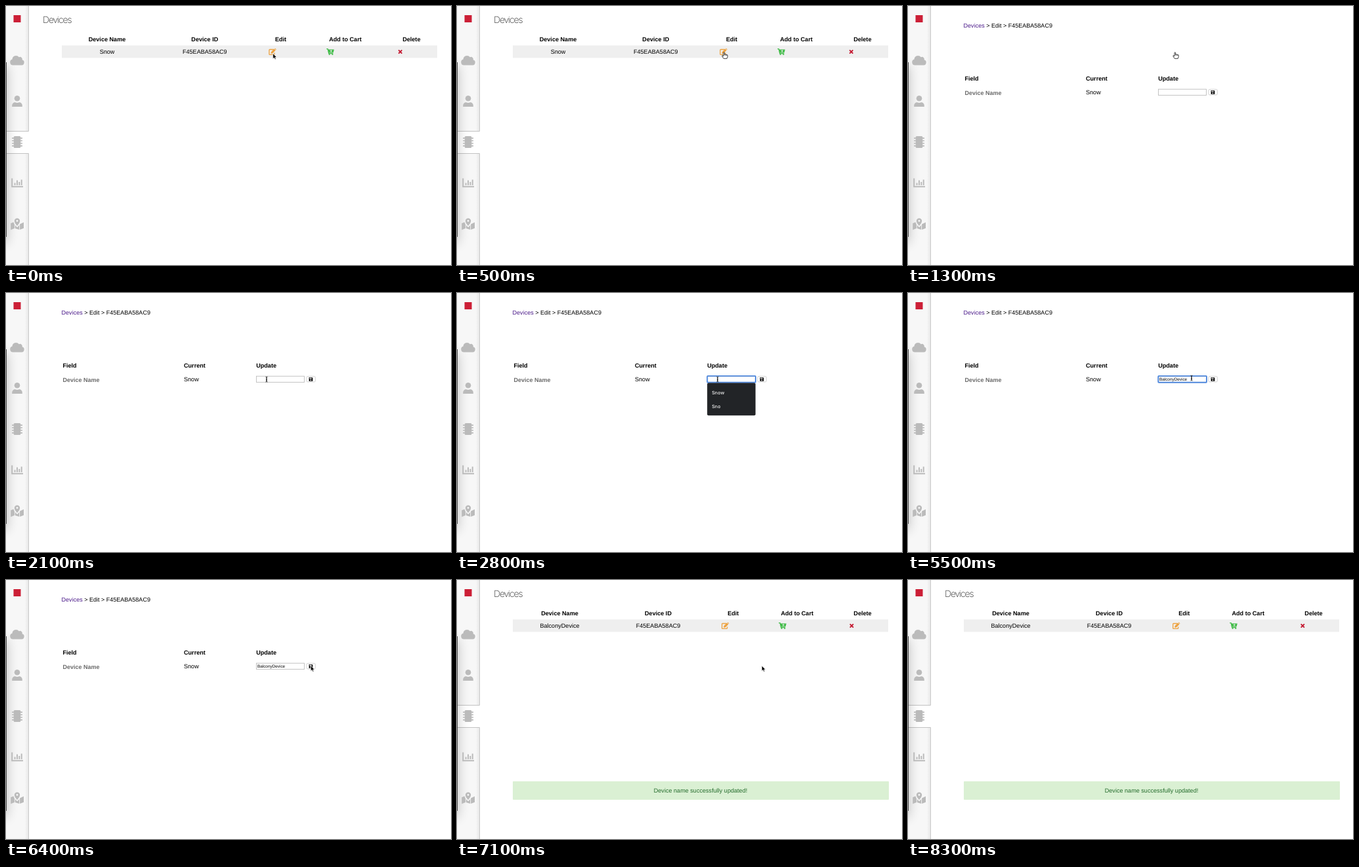
Write an HTML page that moves like this. It is 678 px wide and 396 px high and loops after 9.1 s.

```html
<!DOCTYPE html>
<html lang="en">
<head>
<meta charset="utf-8">
<title>Devices</title>
<style>
  html, body { margin: 0; width: 100%; height: 100%; overflow: hidden; background: #fff; }
  svg { display: block; }
  text { font: 9.1px "Liberation Sans", Arial, sans-serif; text-rendering: geometricPrecision; }
  .b { font-weight: bold; }
  .mid { text-anchor: middle; }
  .title { font: 200 14px Inter, Roboto, sans-serif; letter-spacing: -1.15px; fill: #222; }
  .crumb { font-size: 9.03px; }
  .typed { font-size: 6.4px; }
  .option { font: 500 7.2px Inter, sans-serif; fill: #f2f2f2; }
</style>
</head>
<body>
<svg width="678" height="396" viewBox="0 0 678 396">
  <defs>
    <linearGradient id="edge">
      <stop offset="0" stop-color="#000" stop-opacity="0"/>
      <stop offset="1" stop-color="#000" stop-opacity=".07"/>
    </linearGradient>
    <filter id="soft" x="-40" y="-60" width="100" height="520" filterUnits="userSpaceOnUse">
      <feGaussianBlur stdDeviation="9"/>
    </filter>
    <clipPath id="side"><rect width="34" height="396"/></clipPath>
  </defs>

  <!-- sidebar -->
  <rect width="34.5" height="396" fill="#f7f7f7"/>
  <rect x="29" width="5.5" height="396" fill="url(#edge)"/>
  <rect x="34" width="1" height="396" fill="#c9c9c9"/>
  <g id="tab">
    <rect y="191.5" width="35" height="34" fill="#fff"/>
    <path d="M0 191.5H34.5M0 225.5H34.5" stroke="#bdbdbd" stroke-width=".9"/>
  </g>
  <g clip-path="url(#side)">
    <rect x="-14" y="92" width="15" height="270" fill="#000" opacity=".24" filter="url(#soft)"/>
    <rect y="86" width="1" height="267" fill="#4a4a4a"/>
  </g>
  <rect x="11.5" y="14" width="11" height="11" fill="#cc1f36"/>
  <g fill="#bbb">
    <path d="M10.5 90.5a4.6 4.6 0 0 1-1-9 5.7 5.7 0 0 1 10.3-3.2 3.4 3.4 0 0 1 4.9 4 4.2 4.2 0 0 1-.8 8.2z"/>
    <circle cx="17" cy="141.2" r="4.3"/>
    <path d="M9.2 153.9v-2a4.6 4.6 0 0 1 4.6-4.6q3.2 1.4 6.4 0a4.6 4.6 0 0 1 4.6 4.6v2z"/>
    <rect x="11.7" y="199" width="10.6" height="18" rx="1.6"/>
    <path d="M9 202.2h16M9 206h16M9 210h16M9 213.8h16" stroke="#bbb" stroke-width="1.7"/>
    <path d="M9.2 263.5V276.3H26M13.6 274v-3.6M17 274v-7.6M20.3 274v-5M23.7 274v-8.6" fill="none" stroke="#bbb" stroke-width="2"/>
    <path d="M7.2 332.3l4.2-1.7q.9 2.5 1.5 3.3v6.2l-5.7 2.2zM13.8 335l3.2 3.6 3.2-3.6v7l-6.4-2zM21.1 333.6l5.9-2.8v9l-5.9 2.3z"/>
    <path d="M17 336.3c-1.6-2-4.2-4.8-4.2-7.7a4.2 4.2 0 0 1 8.4 0c0 2.900-2.600 5.700-4.200 7.700zM17 327a1.500 1.500 0 1 0 .01 0z" fill-rule="evenodd"/>
  </g>

  <g id="before"></g>
  <g id="after"></g>

  <!-- edit form -->
  <g id="form">
    <text class="crumb" x="84.600" y="32.800"><tspan fill="#4b1a8a">Devices</tspan> &gt; Edit &gt; F45EABA58AC9</text>
    <text class="b" x="86.400" y="114.200">Field</text>
    <text class="b" x="271" y="114.200">Current</text>
    <text class="b" x="381.200" y="114.200">Update</text>
    <text class="b" x="86.400" y="135.700" fill="#6b6b6b" style="font-size:9px">Device Name</text>
    <text x="271" y="135.200">Snow</text>
    <rect x="381.500" y="127.200" width="73" height="9.200" fill="#fff" stroke="#bcbcbc" stroke-width=".9"/>
    <rect id="ring" x="381.300" y="126.900" width="73.600" height="9.800" rx=".8" fill="none" stroke="#4e87dc" stroke-width="1.900"/>
    <text id="typed" class="typed" x="382.900" y="134.100"></text>
    <rect id="caret" y="128.500" width=".8" height="7.200"/>
    <rect id="button" x="458" y="127.400" width="13.400" height="8.600" rx="2" fill="#fff" stroke="#c8c8c8" stroke-width=".8"/>
    <path d="M461.600 129h4.700l1 1v4.700h-5.700zM462.500 129.800v1.500h3.200v-1.500zM464.400 132.200a.9.9 0 1 0 .01 0z" fill-rule="evenodd"/>
    <g id="menu">
      <rect x="381.200" y="137.600" width="73.600" height="49.600" rx="2" fill="#222427"/>
      <text class="option" x="388.200" y="155.200">Snow</text>
      <text class="option" x="388.200" y="175.500">Sno</text>
    </g>
  </g>

  <!-- pointers, hot spot at 0,0 -->
  <g id="pointer">
    <path id="arrow" d="M0 0V8.200L1.900 6.500 3.200 9.300 4.600 8.700 3.400 6H5.900z" stroke="#fff" stroke-width=".7"/>
    <path id="hand" d="M-1 .9q1-1.500 1.700 0V3.600q1-.8 1.600.2 1-.7 1.600.3 1.300-.4 1.300 1V7.300l-1 2.600H-.7L-3.100 6.300q-.3-1.500 1-1L-1 6.300zM.7 3.600V5M2.300 3.900V5.200M3.900 4.200V5.400" fill="#fff" stroke="#111" stroke-width=".8" stroke-linejoin="round"/>
    <path id="beam" d="M-1.500-4Q0-4 0-3V3Q0 4-1.500 4M1.500-4Q0-4 0-3V3Q0 4 1.500 4M-.9.900H.9" fill="none" stroke="#111" stroke-width=".8"/>
  </g>
</svg>
<script>
const $ = id => document.getElementById(id);
const show = (id, on) => $(id).setAttribute('display', on ? 'inline' : 'none');

const icons = {
  edit: `<path d="M7.500 1.700H1.600Q.7 1.700.7 2.600V8.700Q.7 9.600 1.600 9.600H7.800Q8.700 9.600 8.700 8.700V6.600" fill="none" stroke="#eda23f" stroke-width="1.300"/>
    <path d="M3.600 5.500L8.300.8 10.500 3 5.800 7.700 3.300 8zM8.800.3Q9.600-.3 10.300.3L11.100 1.100Q11.700 1.800 11.100 2.500z" fill="#eda23f"/>`,
  cart: `<g fill="#3fbb46"><path d="M0 .8H2L3.500 7.700H10" fill="none" stroke="#3fbb46" stroke-width="1.300"/>
    <path d="M2.300 1.700H11.600L10.400 6.500H3.300z"/><circle cx="4.400" cy="9.200" r="1.100"/><circle cx="9.100" cy="9.200" r="1.100"/></g>
    <path d="M7 2.300V5.700M5.300 4H8.700" stroke="#efefef" stroke-width=".9"/>`,
  remove: '<path d="M.9.900L6.100 6.100M6.100.9L.9 6.100" stroke="#c3142d" stroke-width="1.900"/>'
};
const label = (x, y, s, cls = '') => `<text class="mid ${cls}" x="${x}" y="${y}">${s}</text>`;
const icon = (name, x, y) => `<g transform="translate(${x} ${y})">${icons[name]}</g>`;

function deviceList(name, columns, [edit, cart, remove]) {
  const heads = ['Device Name', 'Device ID', 'Edit', 'Add to Cart', 'Delete'];
  return '<text class="title" x="56" y="25.500">Devices</text>' +
    '<rect x="85" y="60.300" width="572" height="19" fill="#efefef"/>' +
    heads.map((h, i) => label(columns[i], 53.700, h, 'b')).join('') +
    label(columns[0], 73, name) + label(columns[1], 73, 'F45EABA58AC9') +
    icon('edit', edit, 64.800) + icon('cart', cart, 64.800) + icon('remove', remove, 66.500);
}
$('before').innerHTML = deviceList('Snow', [154, 302.800, 418.500, 517, 617.800], [400.300, 488.300, 597.200]);
$('after').innerHTML = deviceList('BalconyDevice', [156.500, 306.500, 420.800, 518.200, 618], [403, 490.200, 597.800]) +
  '<rect x="85" y="307.700" width="573" height="28.300" rx="1" fill="#daf0d3"/>' +
  '<text class="mid" x="371" y="325.200" fill="#236b2b">Device name successfully updated!</text>';

// time, x, y, shape
const path = [
  [0, 406.700, 72.500, 'arrow'], [300, 406, 71.500, 'hand'], [500, 407, 70.500, 'hand'],
  [1500, 407, 70.500, 'hand'], [1600, 407, 76, 'arrow'], [1800, 404, 104, 'arrow'],
  [2000, 398, 129, 'beam'], [2100, 397, 132, 'beam'], [3100, 0, 0, ''],
  [5300, 397, 132, 'beam'], [5500, 432, 130, 'beam'], [5600, 457, 126, 'arrow'],
  [5800, 482, 123, 'arrow'], [6100, 464.300, 131, 'arrow'], [8000, 464.300, 131, 'arrow'],
  [8100, 535, 88, 'arrow'], [8200, 636, 18.500, 'arrow'], [8300, 0, 0, '']
];
const word = 'BalconyDevice';
const keys = [3100, 3300, 3400, 3500, 3600, 3700, 4100, 4400, 4600, 4700, 4800, 4900, 5000];

function drawPointer(t) {
  const i = path.findLastIndex(p => p[0] <= t);
  const [t0, x0, y0, shape] = path[i];
  const [t1, x1, y1, next] = path[i + 1] || path[i];
  const k = next && t1 > t0 ? (t - t0) / (t1 - t0) : 0;
  $('pointer').setAttribute('transform', `translate(${x0 + (x1 - x0) * k} ${y0 + (y1 - y0) * k})`);
  for (const id of ['arrow', 'hand', 'beam']) show(id, id === shape);
}

function draw(now) {
  const t = Math.floor(now % 9100 / 100) * 100;
  const form = t >= 1300 && t < 7100;
  const focus = t >= 2300 && t < 6200;
  show('before', t < 1300);
  show('after', t >= 7100);
  show('form', form);
  show('tab', !form);
  show('ring', focus);
  show('menu', t >= 2300 && t < 3100);

  const count = keys.filter(k => k <= t).length;
  $('typed').textContent = word.slice(0, count);
  const lastKey = count ? keys[count - 1] : 2300;
  show('caret', focus && (t - lastKey) % 1000 < 500);
  if (focus) $('caret').setAttribute('x', 382.900 + $('typed').getComputedTextLength());
  $('button').setAttribute('fill', t >= 6200 && t < 6400 ? '#ddd' : '#fff');
  drawPointer(t);
}

const start = performance.now();
(function frame() {
  draw(performance.now() - start);
  requestAnimationFrame(frame);
})();
</script>
</body>
</html>
```
